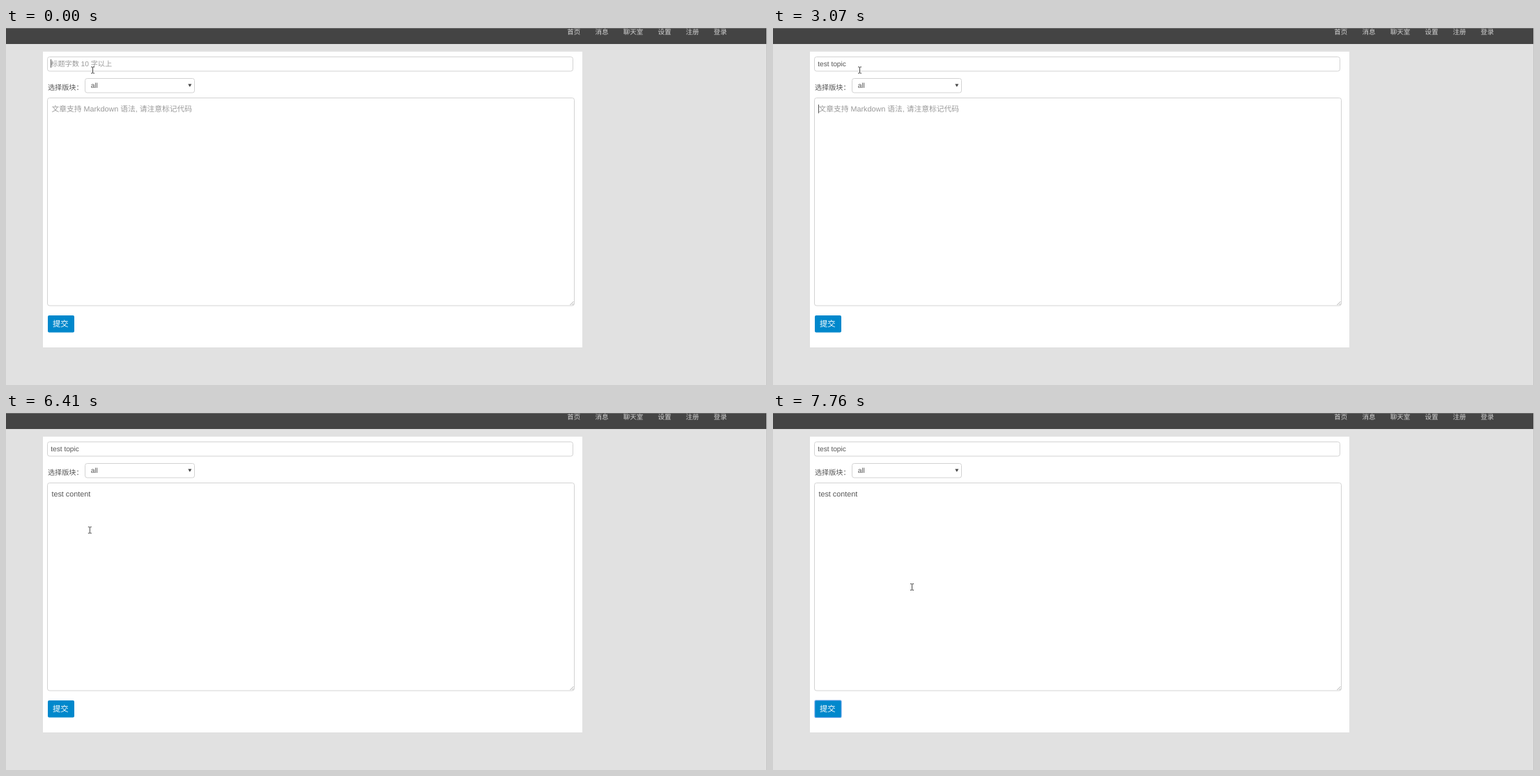
These frames come from a looping animation (1092x513 px, 8 s). An HTML page:

```html
<!DOCTYPE html>
<html lang="zh-CN">
<head>
<meta charset="utf-8">
<title>发布话题</title>
<style>
html, body { margin: 0; height: 100%; overflow: hidden; background: #e1e1e1; }
svg { display: block; }
text {
  font-family: "Liberation Sans", "Noto Sans CJK SC", "Noto Sans CJK", sans-serif;
  white-space: pre; text-rendering: geometricPrecision; fill: #555;
}
.nav text { font-size: 9.5px; fill: #d4d4d4; }
.field { fill: #fff; stroke: #d3d3d3; }
.small { font-size: 10.15px; }
.large { font-size: 10.78px; }
.ring { fill: none; stroke: #5b9be8; }
</style>
</head>
<body>
<svg width="1092" height="513" viewBox="0 0 1092 513">
  <rect width="1092" height="513" fill="#e1e1e1"/>
  <rect width="1092" height="23" fill="#444"/>
  <path d="M0 .5H1092" stroke="#6c6c6c"/>
  <path d="M1091.5 0V513" stroke="#c4c4c4"/>
  <g class="nav">
    <text x="805.3" y="8.8">首页</text>
    <text x="845.5" y="8.8">消息</text>
    <text x="885.8" y="8.8">聊天室</text>
    <text x="935.4" y="8.8">设置</text>
    <text x="975.4" y="8.8">注册</text>
    <text x="1015.6" y="8.8">登录</text>
  </g>
  <rect x="53" y="34" width="774" height="425" fill="#fff"/>
  <rect class="field" x="59.5" y="41.5" width="754" height="20.5" rx="3"/>
  <rect class="field" x="113.5" y="72.5" width="157" height="20.5" rx="3"/>
  <rect class="field" x="59.5" y="100.5" width="756" height="298.5" rx="3"/>
  <path d="M809.5 398L814.5 393M812.5 398L814.5 396" stroke="#999" stroke-width=".8"/>
  <text class="small" x="60" y="89.3">选择版块：</text>
  <text class="small" x="121.7" y="86">all</text>
  <path d="M261.3 80.5h5l-2.5 4.2z" fill="#444"/>
  <text id="title" class="small" x="64.3" y="54.8"></text>
  <text id="content" class="large" x="65.5" y="120.4"></text>
  <rect id="caret" width="1" fill="#555"/>
  <rect id="selectRing" class="ring" x="113.5" y="72.2" width="157.5" height="21" rx="2" stroke-width="1.5"/>
  <rect id="button" x="60" y="413" width="38" height="24.6" rx="2"/>
  <rect id="buttonRing" class="ring" x="60" y="413" width="38" height="24.6" rx="1"/>
  <text x="67" y="429.2" font-size="11.3" style="fill:#fff">提交</text>
  <path id="beam" d="M-2.5 -4.5H-.7L0 -4L.7 -4.5H2.5M0 -4V4M-2.5 4.5H-.7L0 4L.7 4.5H2.5" fill="none" stroke="#333" stroke-width=".9"/>
  <path id="hand" d="M-1.6 1.5V-4.6Q-.7 -6 .2 -4.6V-1.5L3.6 -.7Q4.7 -.3 4.6 .8V3L3.5 5V7H-1.5V5.6L-4 1.8Q-4.2 .4 -3 .5Z" fill="#fff" stroke="#222" stroke-width=".8" stroke-linejoin="round"/>
</svg>
<script>
const LOOP = 8000;
const el = id => document.getElementById(id);
const show = (node, on) => node.setAttribute("visibility", on ? "visible" : "hidden");
const count = (times, t) => times.filter(at => t >= at).length;

// One time per typed character.
const fields = [
  { node: el("title"), text: "test topic", hint: "标题字数 10 字以上", top: 45, height: 12,
    keys: [130, 440, 710, 860, 1140, 1420, 1540, 1810, 1960, 2270] },
  { node: el("content"), text: "test content", hint: "文章支持 Markdown 语法, 请注意标记代码", top: 110, height: 12.5,
    keys: [3500, 3620, 4050, 4360, 4660, 4910, 5060, 5180, 5300, 5300, 5420, 5850] }
];

// Pointer stops: time, x, y, shape.
const stops = [
  [0, 124.5, 60.5, "beam"], [6410, 120.3, 168.3, "beam"], [6530, 119, 262, "beam"],
  [6650, 110, 372, "beam"], [6770, 93, 432.5, "hand"], [6920, 81.3, 432.5, "hand"],
  [7190, 82, 424, "hand"], [7340, 84.8, 398, "beam"], [7610, 142.5, 284, "beam"],
  [7760, 199.5, 250, "beam"]
];

function draw(t) {
  const within = (from, to) => t >= from && t < to;

  for (const f of fields) {
    const n = count(f.keys, t);
    f.node.textContent = n ? f.text.slice(0, n) : f.hint;
    f.node.style.fill = n ? "#555" : "#999";
    f.end = +f.node.getAttribute("x") + (n ? f.node.getComputedTextLength() : 0);
  }

  const focus = fields[t < 2540 ? 0 : 1];
  const caret = el("caret");
  caret.setAttribute("x", Math.floor(focus.end));
  caret.setAttribute("y", focus.top);
  caret.setAttribute("height", focus.height);
  show(caret, t < 2540 || within(3070, 6410) || within(6920, 7070));

  show(el("selectRing"), within(2540, 3070));
  show(el("buttonRing"), t >= 7070);
  el("button").setAttribute("fill", within(6920, 7460) ? "#0062cc" : "#08c");

  const [, x, y, shape] = stops.filter(s => t >= s[0]).pop();
  for (const id of ["beam", "hand"]) {
    show(el(id), id === shape);
    el(id).setAttribute("transform", `translate(${x} ${y})`);
  }
}

const start = performance.now();
function tick() {
  draw((performance.now() - start) % LOOP);
  requestAnimationFrame(tick);
}
tick();
</script>
</body>
</html>
```
